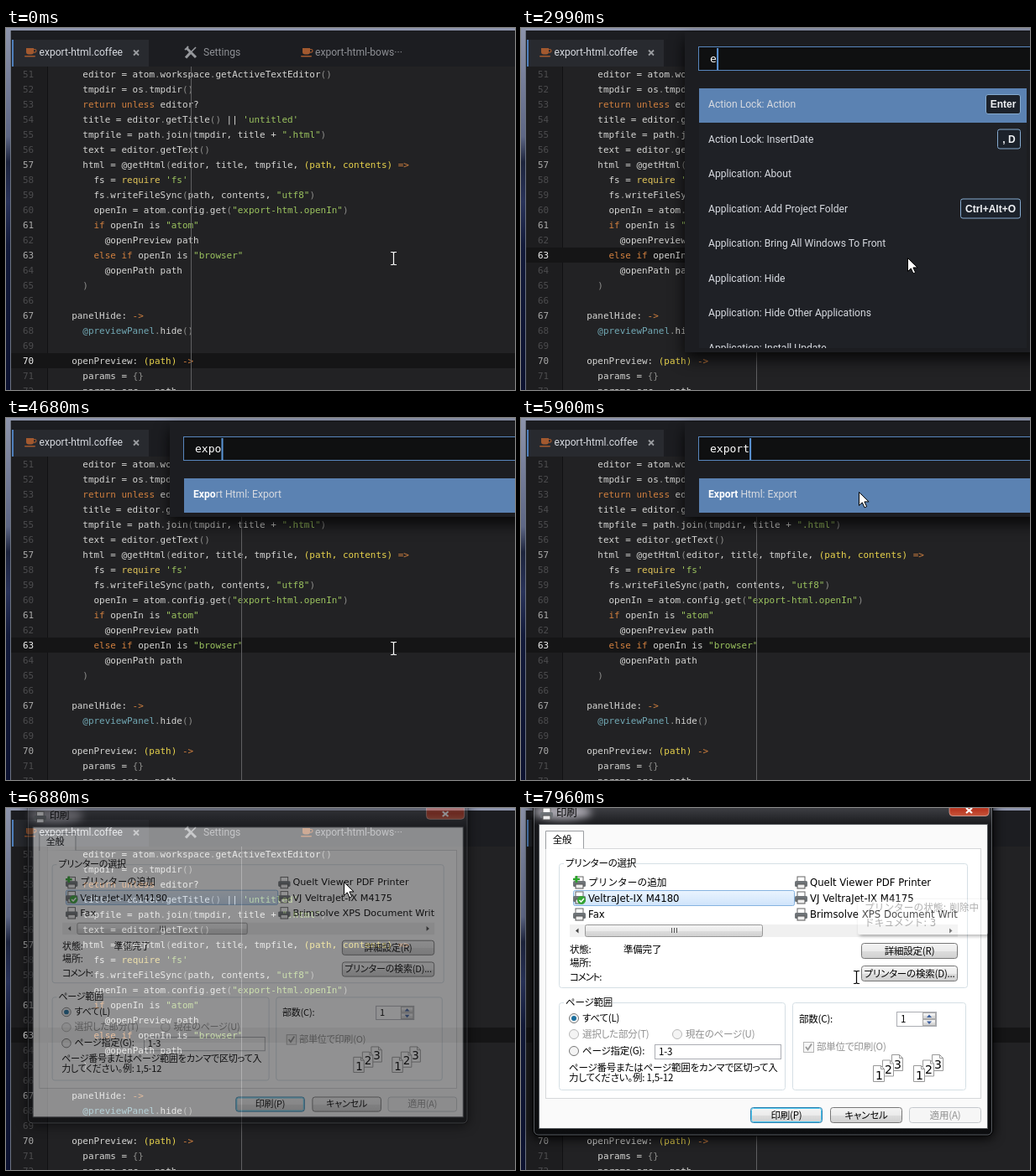
Animation, 606 px wide and 432 px high, one loop 8000 ms. Source, as an HTML page:

```html
<!DOCTYPE html>
<html lang="en">
<head>
<meta charset="utf-8">
<title>Export and print</title>
<style>
html, body { margin: 0; width: 100%; height: 100%; overflow: hidden; background: #1c1d21; }
svg { display: block; width: 100vw; height: 100vh; }
text { white-space: pre; }
.code { font: 10.95px "DejaVu Sans Mono", monospace; fill: #d6d6d4; }
.ui { font: 12.1px Roboto, sans-serif; fill: #d7dae0; }
.key { font: bold 12px "Liberation Sans", sans-serif; fill: #f0f2f5; text-anchor: middle; }
.input { font: 13px "DejaVu Sans Mono", monospace; fill: #fff; }
.jp { font: 11.5px "Noto Sans CJK JP", "Noto Sans CJK", sans-serif; font-feature-settings: "palt"; letter-spacing: -.2px; fill: #000; }
.list { font: 11.7px "DejaVu Sans", "Noto Sans CJK JP", sans-serif; fill: #000; }
.mid { text-anchor: middle; }
.off { fill: #909090; }
</style>
</head>
<body>
<svg id="stage" viewBox="0 0 606 432" preserveAspectRatio="none"></svg>
<script>
const LOOP = 8000;
const stage = document.getElementById('stage');

const rect = (x, y, w, h, fill, extra = '') =>
  `<rect x="${x}" y="${y}" width="${w}" height="${h}" fill="${fill}" ${extra}/>`;
const text = (x, y, str, cls, extra = '') =>
  `<text x="${x}" y="${y}" class="${cls}" ${extra}>${str}</text>`;
const path = (d, stroke, width = 1, fill = 'none') =>
  `<path d="${d}" fill="${fill}" stroke="${stroke}" stroke-width="${width}"/>`;
const place = (x, y, body) => `<g transform="translate(${x} ${y})">${body}</g>`;

// ---------- editor ----------
const FIRST = 51, PITCH = 18;
const rowTop = n => 46 + (n - FIRST) * PITCH;
const foldable = [57, 61, 63, 67, 70];
const source = `    editor = atom.workspace.getActiveTextEditor()
    tmpdir = os.tmpdir()
    return unless editor?
    title = editor.getTitle() || 'untitled'
    tmpfile = path.join(tmpdir, title + ".html")
    text = editor.getText()
    html = @getHtml(editor, title, tmpfile, (path, contents) =>
      fs = require 'fs'
      fs.writeFileSync(path, contents, "utf8")
      openIn = atom.config.get("export-html.openIn")
      if openIn is "atom"
        @openPreview path
      else if openIn is "browser"
        @openPath path
    )

  panelHide: ->
    @previewPanel.hide()

  openPreview: (path) ->
    params = {}
    params.src = path`.split('\n');

const tokens = /("[^"]*"|'[^']*')|\b(return|unless|if|else)\b|([-=]>)|(\([\w, ]+\)(?= [-=]>))|\b(require)\b|(@previewPanel)|[(){}.]+/g;
const colors = ['#9cc45f', '#d2803f', '#d2803f', '#e8d34c', '#e3c65a', '#72a9b5'];
const highlight = line => line.replace(tokens, (m, ...found) => {
  const i = found.slice(0, 6).findIndex(Boolean);
  return `<tspan fill="${colors[i] || '#8d8d8b'}">${m}</tspan>`;
});

function codeLine(line, i) {
  const indent = line.search(/\S|$/), y = rowTop(FIRST + i) + 13;
  return text(65 + indent * 6.59, y, highlight(line.trim()), 'code');
}

function lineNumber(line, i) {
  const n = FIRST + i, fold = foldable.includes(n);
  return text(20, rowTop(n) + 13, n, 'code',
    `id="n${n}" style="fill:${fold ? '#aaa' : '#4c4c4e'}"`);
}

const cup = x => place(x, 24,
  path('M2 0h9v4.5a3 3 0 0 1-3 3h-3a3 3 0 0 1-3-3z', 'none', 0, '#a2592f') +
  path('M11 1.5h1.2a1.6 1.6 0 0 1 0 3.6h-1.2', '#a2592f', 1.2) +
  rect(0, 9, 13, 1.6, '#a2592f', 'rx=".8"'));

const tools = place(212, 21,
  path('M3 3L14 14', '#96989c', 3) + path('M1 5L3.2 3.2 5 1', '#96989c', 2) +
  path('M14 2L8 8', '#96989c', 1.6) + path('M8 8L2 14.5', '#96989c', 3.2));

const editor =
  rect(0, 0, 606, 432, '#8d94ab') +
  rect(0, 0, 6, 432, 'url(#desk)') +
  rect(5, 3, 601, 429, '#1c1d21') +
  rect(6, 46, 600, 386, '#222224') +
  rect(6, 46, 43, 386, '#1d1d1f') + rect(49, 46, 1, 386, '#111113') +
  `<rect id="band" x="6" width="600" height="18" fill="#151516"/>` +
  source.map(lineNumber).join('') + source.map(codeLine).join('') +
  `<rect id="guide" y="46" width="1" height="386" fill="#606062"/>` +
  rect(283, 262, 1, 18, '#fff', 'id="caret"') +
  rect(7, 14, 163, 32, '#282a2f') + rect(7, 14, 2, 32, '#4f80bd') +
  cup(22) + text(39.5, 33, 'export-html.coffee', 'ui') +
  path('M152 26.5l6 6m0-6l-6 6', '#9a9ca0', 1.8) +
  tools + text(235, 33, 'Settings', 'ui', 'style="fill:#8f9196"') +
  cup(351) + text(368, 33, 'export-html-bows···', 'ui', 'style="fill:#8f9196"') +
  rect(5, 3, 1, 429, '#6d7482');

// ---------- command palette ----------
const all = ['Action Lock: Action|Enter', 'Action Lock: InsertDate|, D', 'Application: About',
  'Application: Add Project Folder|Ctrl+Alt+O', 'Application: Bring All Windows To Front',
  'Application: Hide', 'Application: Hide Other Applications', 'Application: Install Update'];
const withE = [...all.filter(s => /e/i.test(s.split('|')[0])),
  'Editor: Delete Line', 'Export Html: Export', 'Tree View: Reveal Active File'];
const withEx = ['Export Html: Export', 'Editor: Fold Next', 'Find And Replace: Find Next',
  'Pane: Show Next Item', 'Tree View: Expand Directory', 'Window: Focus Next Pane',
  'Editor: Select To End Of Next Word'];
const one = ['Export Html: Export'];

// time, typed text, matched text, items
const typing = [[2470, '', '', all], [2990, 'e', '', all], [3110, 'e', 'e', withE],
  [3380, 'ex', 'ex', withEx], [3780, 'exp', 'exp', one], [3900, 'expo', 'expo', one],
  [4800, 'expor', 'expor', one], [5070, 'export', 'export', one]];

function embolden(label, query) {
  let i = 0;
  return [...label].map(c => c.toLowerCase() === query[i]
    ? (i++, `<tspan font-weight="700" fill="#fff">${c}</tspan>`) : c).join('');
}

function keyBox(label, y) {
  const w = { 'Enter': 42, ', D': 28 }[label] || 72;
  return rect(595.5 - w, y + 7.5, w - 1, 23, '#1c222b', 'rx="2.5" stroke="#86abd0"') +
    text(595 - w / 2, y + 23.3, label, 'key');
}

function palette([, typed, query, items]) {
  const bottom = items.length > 1 ? 387 : 118;
  const width = items.length > 7 ? 390 : 400;
  const rows = items.map((item, i) => {
    const [label, key] = item.split('|'), y = 72 + i * 41.5;
    return (i ? '' : rect(212, y, width, 41, '#5b82b2')) +
      text(223, y + 23, embolden(label, query), 'ui') + (key ? keyBox(key, y) : '');
  }).join('');
  return rect(195, 5, 440, bottom - 5, '#1c1d21', 'style="filter:drop-shadow(0 8px 9px #000c)"') +
    rect(211.5, 22.5, 410, 28, '#0f1011', 'stroke="#5886bd"') +
    text(225, 41, typed, 'input') +
    rect(225.3 + typed.length * 7.8, 24, 2, 26, '#5b95d8', 'id="blink"') +
    `<g clip-path="url(#rows)">${rect(212, 72, width, bottom - 77, '#1f2126')}${rows}</g>`;
}

// ---------- print dialog ----------
const button = (x, y, w, h, label, cls = '', stroke = '#777') =>
  rect(x + .5, y + .5, w - 1, h - 1, cls ? '#f6f6f6' : 'url(#btn)', `rx="3" stroke="${stroke}"`) +
  text(x + w / 2, y + h / 2 + 4, label, 'jp mid ' + cls);

const group = (x, y, w, h, label, labelWidth) =>
  rect(x + .5, y + .5, w, h, 'none', 'rx="3" stroke="#d5dfe5"') +
  rect(x + 6, y - 4, labelWidth + 4, 9, '#fff') + text(x + 8, y + 4, label, 'jp');

const radio = (x, y, label, cls = '', on = false) =>
  `<circle cx="${x}" cy="${y}" r="5.5" fill="#f4f4f4" stroke="${cls ? '#b8b8b8' : '#777'}"/>` +
  (on ? `<circle cx="${x}" cy="${y}" r="3" fill="#1c6f9e"/>` : '') +
  text(x + 10, y + 4, label, 'jp ' + cls);

const printer = (x, y, badge = '') => place(x, y,
  rect(3, 0, 9, 6, '#fff', 'stroke="#666"') + rect(0, 5, 15, 7, '#6f7478', 'rx="1.5"') +
  rect(3, 9, 9, 5, '#eee', 'stroke="#555"') +
  (badge === '+' ? path('M4 -1v8M0 3h8', '#2aa52a', 2.6) : '') +
  (badge === 'v' ? `<circle cx="10" cy="10" r="5" fill="#35a535"/>` + path('M7.5 10l2 2 3.5-4', '#fff', 1.5) : ''));

const sheet = n => place((n - 1) * 11, 13 - (n - 1) * 6.5,
  path('M.5 .5h9l4 4v15h-13z', '#999', 1, '#fff') + path('M9.5 .5v4h4', '#999') +
  text(7.5, 16.5, n, 'list mid', 'style="font-size:14px"'));
const collate = x => place(x, 294, [3, 2, 1].map(sheet).join(''));

const dialogParts = [
  rect(14.5, -20, 547, 411, 'url(#glass)', 'rx="6" stroke="#000" style="filter:drop-shadow(0 2px 7px #000)"'),
  rect(15.5, -19, 545, 409, 'none', 'rx="5" stroke="#8b9096" stroke-opacity=".6"'),
  `<ellipse cx="50" cy="5" rx="34" ry="9" fill="#dcd8e2" opacity=".7" style="filter:blur(5px)"/>`,
  printer(23, 0), text(42, 9.5, '印刷', 'jp', 'style="font-size:12.5px"'),
  rect(510, -10, 47, 19.5, 'url(#close)', 'rx="4" stroke="#e5b5ad" stroke-opacity=".7"'),
  path('M530 0l7 6m0-6l-7 6', '#fff', 2.2),
  rect(21.5, 19.5, 534, 363, '#fafafa', 'stroke="#54585c"'),
  rect(29.5, 48.5, 518, 298, '#fff', 'stroke="#d6d8da"'),
  path('M29.5 49V27.5H74.5V48.5', '#9b9ea2', 1, '#fff'),
  text(49, 41.5, '全般', 'jp mid'),

  group(45, 66, 486, 148, 'プリンターの選択', 78),
  rect(62.5, 98.5, 263, 18, 'url(#pick)', 'rx="2" stroke="#86b3e0"'),
  printer(62, 82, '+'), printer(62, 100, 'v'), printer(62, 120),
  printer(326, 82), printer(326, 100), printer(326, 120),
  text(80, 92.5, 'プリンターの追加', 'list'),
  text(80, 111.5, 'VeltraJet-IX M4180', 'list'), text(80, 130.5, 'Fax', 'list'),
  `<g clip-path="url(#names)">`,
  text(344, 92.5, 'Quelt Viewer PDF Printer', 'list'),
  text(344, 111.5, 'VJ VeltraJet-IX M4175', 'list'),
  text(344, 130.5, 'Brimsolve XPS Document Writer', 'list'), `</g>`,
  rect(58, 139, 462, 15, '#f0f0f0'),
  rect(76.5, 139.5, 211, 14, 'url(#btn)', 'rx="2" stroke="#979797"'),
  path('M179.5 143v6m3-6v6m3-6v6', '#555'),
  path('M68.5 143.5v6l-3.5-3z', 'none', 0, '#444'), path('M510 143.5v6l3.5-3z', 'none', 0, '#444'),
  text(58, 173, '状態:', 'jp'), text(122, 173, '準備完了', 'jp'),
  text(58, 189, '場所:', 'jp'), text(58, 206, 'コメント:', 'jp', 'style="letter-spacing:-1.2px"'),
  button(405, 161, 115, 19, '詳細設定(R)'), button(405, 188, 115, 19, 'プリンターの検索(D)...'),

  group(45, 232, 269, 104, 'ページ範囲', 54),
  radio(63, 251, 'すべて(L)', '', true),
  radio(63, 270, '選択した部分(T)', 'off'), radio(186, 270, '現在のページ(U)', 'off'),
  radio(63, 290, 'ページ指定(G):'),
  rect(159.5, 282.5, 150, 17, '#fff', 'stroke="#abadb3"'), text(164, 294.5, '1-3', 'jp'),
  text(57, 313.5, 'ページ番号またはページ範囲をカンマで区切って入', 'jp'),
  text(57, 326, '力してください。例: 1,5-12', 'jp'),

  group(323, 232, 206, 104, '', -4),
  text(331, 255.5, '部数(C):', 'jp'),
  rect(447.5, 243.5, 47, 17, '#fff', 'stroke="#abadb3"'), text(452, 256, '1', 'jp'),
  rect(478.5, 244.5, 15, 7, 'url(#btn)', 'stroke="#aaa"'), rect(478.5, 252.5, 15, 7, 'url(#btn)', 'stroke="#aaa"'),
  path('M483 250l3-3.5 3 3.5z', 'none', 0, '#3c5f9e'), path('M483 254.5l3 3.5 3-3.5z', 'none', 0, '#3c5f9e'),
  rect(336.5, 279.5, 12, 12, '#f6f6f6', 'stroke="#b5b5b5"'), path('M339 285l2.5 3.5 4.5-7', '#999', 1.8),
  text(352, 289, '部単位で印刷(O)', 'jp off'),
  collate(419), collate(467),

  button(273, 357, 86, 19, '印刷(P)', '', '#2f7fae'),
  rect(274.5, 358.5, 83, 16, 'none', 'rx="2" stroke="#4cc6ee"'),
  button(368, 357, 86, 19, 'キャンセル'), button(462, 357, 86, 19, '適用(A)', 'off', '#c4c8cc')
].join('');

const tip = rect(401, 109, 155, 42, '#fff', 'rx="2" style="filter:drop-shadow(2px 2px 2px #000)"') +
  text(409, 123, 'プリンターの状態: 削除中', 'list') + text(409, 141, 'ドキュメント: 3', 'list');

// ---------- pointers ----------
const arrow = path('M.5 .5v16l3.8-3.6 2.7 6 2.6-1.2-2.7-5.8h5.2z', '#000', 1, '#fff');
const beam = 'M-3.5-7.5h2.5l1 1 1-1h2.5M0-6.5v13M-3.5 7.5h2.5l1-1 1 1h2.5';
// time, shape, x, y
const moves = [[0, 'beam', 461.5, 275], [2470, 'arrow', 460, 274], [3780, 'beam', 461.5, 275],
  [5480, 'beam', 437.5, 183], [5630, 'arrow', 415, 120], [5760, 'arrow', 402, 88], [7960, 'beam', 399.5, 202]];

const fade = (id, ...stops) => `<linearGradient id="${id}" x2="0" y2="1">` + stops.map(([o, c]) =>
  `<stop offset="${o}" stop-color="${c}"/>`).join('') + '</linearGradient>';

stage.innerHTML = '<defs>' +
  fade('desk', [0, '#8d94ab'], [.3, '#5d6685'], [.37, '#1c233c'], [.48, '#28325a'], [.6, '#121a3a'], [1, '#0c1230']) +
  fade('glass', [.05, '#3c3d42'], [.1, '#17181b'], [1, '#0c0d0f']) +
  fade('btn', [0, '#f4f4f4'], [.5, '#ebebeb'], [.51, '#dddddd'], [1, '#d0d0d0']) +
  fade('pick', [0, '#ebf4fe'], [1, '#cfe4fb']) +
  fade('close', [0, '#d98a7c'], [.6, '#b8351f'], [1, '#c8563c']) +
  `<clipPath id="rows">${rect(200, 60, 420, 322, '#000')}</clipPath>` +
  `<clipPath id="names">${rect(326, 76, 194, 60, '#000')}</clipPath></defs>` +
  editor + '<g id="palette"></g>' +
  `<g id="dialog">${dialogParts}</g><g id="tip" opacity=".3">${tip}</g>` +
  '<circle id="ring" cx="402.5" cy="89.5" r="9.5" fill="none" stroke="#fff" stroke-opacity=".6"/>' +
  `<g id="arrow">${arrow}</g><g id="beam">${path(beam, 'currentColor', 1.2)}</g>`;

const $ = id => document.getElementById(id);
const show = (id, on) => $(id).setAttribute('display', on ? 'inline' : 'none');
const within = (t, a, b) => t >= a && t < b;
const latest = (steps, t) => steps.filter(s => s[0] <= t).pop();
let drawn;

function update(t) {
  const line = t < 1090 ? 70 : 63;
  $('band').setAttribute('y', rowTop(line));
  $('guide').setAttribute('x', line === 70 ? 220 : 280);
  for (const n of [63, 70]) $('n' + n).style.fill = n === line ? '#f0f0f0' : '#aaa';
  show('caret', within(t, 1210, 1610) || within(t, 2040, 2470) || within(t, 6450, 6730));

  const open = within(t, 2470, 6330);
  show('palette', open);
  if (open) {
    const step = latest(typing, t);
    if (step !== drawn) $('palette').innerHTML = palette(drawn = step);
    show('blink', !within(t, 4300, 4680) && !within(t, 5630, 5900));
  }

  const opening = t < 7040;
  show('dialog', t >= 6880);
  $('dialog').setAttribute('opacity', opening ? .5 : 1);
  $('dialog').setAttribute('transform', opening ? 'translate(11.5 4.3) scale(.959 .953)' : '');
  show('tip', t >= 7800);
  show('ring', within(t, 6190, 6330));

  const [, shape, x, y] = latest(moves, t);
  for (const id of ['arrow', 'beam']) show(id, id === shape);
  $(shape).setAttribute('transform', `translate(${x} ${y})`);
  $('beam').style.color = t < 6880 ? '#fff' : '#000';
}

const start = performance.now();
function frame() {
  update((performance.now() - start) % LOOP);
  requestAnimationFrame(frame);
}
frame();
</script>
</body>
</html>
```
